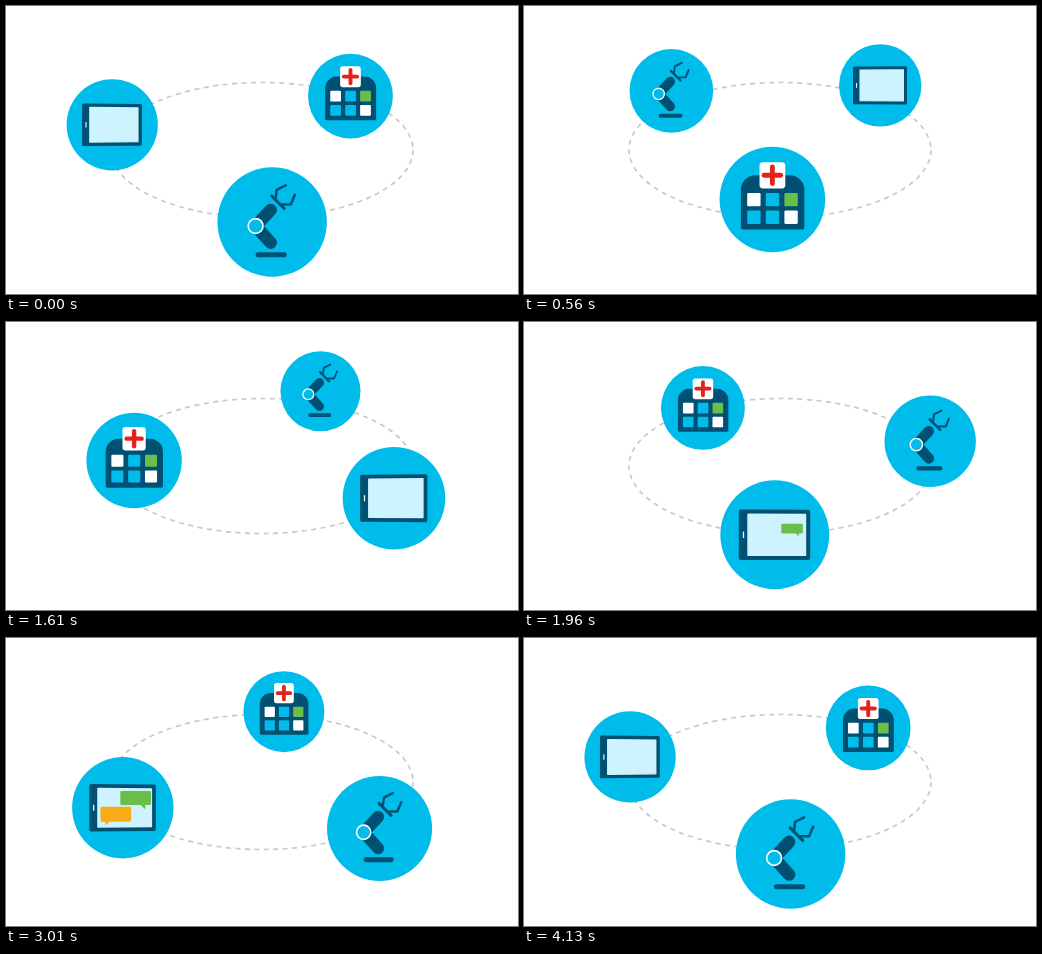
Animation, 512 px wide and 288 px high, one loop 4200 ms. Source, as an HTML page with a canvas:

```html
<!DOCTYPE html>
<html lang="en">
<head>
<meta charset="utf-8">
<title>Connected care</title>
<style>
html, body { margin: 0; width: 100%; height: 100%; overflow: hidden; background: #fff; }
canvas { display: block; width: 512px; height: 288px; }
</style>
</head>
<body>
<canvas id="stage"></canvas>
<script>
const LOOP = 4200, STEP = 1400;
const CYAN = '#00bceb', NAVY = '#005073', GREEN = '#6abf4b', ORANGE = '#fbab18',
      RED = '#e2231a', SCREEN = '#cdf3ff', WHITE = '#fff', GREY = '#c9c9cb';

const canvas = document.getElementById('stage');
const ctx = canvas.getContext('2d');
const dpr = window.devicePixelRatio || 1;
canvas.width = 512 * dpr;
canvas.height = 288 * dpr;

const rad = deg => deg * Math.PI / 180;
const mix = (a, b, k) => a + (b - a) * k;
const clamp = v => Math.min(1, Math.max(0, v));
const ramp = (t, from, to) => clamp((t - from) / (to - from));
const smooth = k => k * k * (3 - 2 * k);

// keys: orbit angle and offset at each stop; bulge: bend of the path on the way to the next one
const items = [
  { draw: tablet,
    keys: [[200, -8, -2], [308, 2, -13], [448, -2, 1]],
    bulge: [[0, -6], [6, 0], [4.6, -1]] },
  { draw: hospital,
    keys: [[306, -0.5, 0.6], [450, 1, -17.5], [596, 0, -0.4]],
    bulge: [[-24, 0], [24, 0], [0, -4]] },
  { draw: robot,
    keys: [[86, 0, 4.7], [222, -2, -11], [335, 10.3, 0.7]],
    bulge: [[-5, 0], [0, -8], [2, -2.3]] }
];

// quick travel, then a damped swing around the stop
function travel(ms) {
  const arrive = 320;
  if (ms < arrive) return Math.pow(ms / arrive, 1.2);
  const s = ms - arrive;
  return 1 + 0.24 * Math.exp(-0.0066 * s) * Math.sin(Math.PI * s / 285);
}

function place(item, t) {
  const i = Math.floor(t / STEP) % 3;
  const k = travel(t % STEP);
  const a = item.keys[i], b = item.keys[(i + 1) % 3];
  const turn = (b[0] - a[0] + 720) % 360;
  const angle = rad(a[0] + turn * k);
  const bend = Math.sin(Math.PI * clamp(k));
  const x = 256 + 151 * Math.cos(angle) + mix(a[1], b[1], k) + item.bulge[i][0] * bend;
  const y = 144 + 67.5 * Math.sin(angle) + mix(a[2], b[2], k) + item.bulge[i][1] * bend;
  const d = y - 73.5;
  return { x, y, r: 40.5 + 0.1 * d + 0.7 * Math.sin(Math.PI * d / 140) };
}

function box(x, y, w, h, r, color) {
  ctx.fillStyle = color;
  ctx.beginPath();
  ctx.roundRect(x, y, w, h, r);
  ctx.fill();
}

function line(points, width, color, cap = 'round') {
  ctx.strokeStyle = color;
  ctx.lineWidth = width;
  ctx.lineCap = cap;
  ctx.lineJoin = 'round';
  ctx.beginPath();
  points.forEach(p => ctx.lineTo(p[0], p[1]));
  ctx.stroke();
}

function disc(x, y, r, color) {
  ctx.fillStyle = color;
  ctx.beginPath();
  ctx.arc(x, y, r, 0, Math.PI * 2);
  ctx.fill();
}

// panel whose two sides differ a little in height
function panel(x0, x1, h, tilt, round, color) {
  const l = h * (1 + tilt) - round, r = h * (1 - tilt) - round;
  ctx.fillStyle = ctx.strokeStyle = color;
  ctx.lineWidth = round * 2;
  ctx.lineJoin = 'round';
  ctx.beginPath();
  ctx.moveTo(x0 + round, -l);
  ctx.lineTo(x1 - round, -r);
  ctx.lineTo(x1 - round, r);
  ctx.lineTo(x0 + round, l);
  ctx.closePath();
  ctx.fill();
  ctx.stroke();
}

// speech bubble that scales from the tip of its tail
function bubble(tipX, tipY, left, top, h, lean, size, color) {
  if (size <= 0) return;
  ctx.save();
  ctx.translate(tipX, tipY);
  ctx.scale(size, size);
  box(left, top, 33, h, 1.5, color);
  ctx.beginPath();
  ctx.moveTo(0, 0);
  ctx.lineTo(0, top + h - 1);
  ctx.lineTo(lean, top + h - 1);
  ctx.fill();
  ctx.restore();
}

function tablet(t, x) {
  const tilt = (256 - x) / 150 * 0.011;
  panel(-36, 35.5, 25.2, tilt, 2, NAVY);
  panel(-27.5, 31.5, 21.2, tilt, 0.8, SCREEN);
  line([[-31.3, -3.2], [-31.3, 3.2]], 1.3, WHITE, 'butt');
  const green = smooth(ramp(t, 1840, 2040)) * (1 - smooth(ramp(t, 3290, 3470)));
  const orange = smooth(ramp(t, 2300, 2500)) * (1 - smooth(ramp(t, 3490, 3680)));
  bubble(24, 1.8, -26.7, -19.8, 15, -5.5, green, GREEN);
  bubble(-18.7, 19, -5.3, -20, 16, 5.5, orange, ORANGE);
}

function hospital(t) {
  box(-32.5, -25, 65.5, 56, [15, 15, 2, 2], NAVY);
  box(-13.3, -38.4, 26.6, 27, 3.5, WHITE);
  line([[-8.6, -25], [8.6, -25]], 5, RED);
  line([[0, -33.6], [0, -16.4]], 5, RED);
  const swap = t > 840 && t < 1540;
  const rows = [[WHITE, CYAN, GREEN], swap ? [CYAN, WHITE, CYAN] : [CYAN, CYAN, WHITE]];
  rows.forEach((row, j) => row.forEach((color, i) =>
    box(-26 + 19.2 * i, -6.7 + 18.1 * j, 13.8, 13.8, 1.2, color)));
}

function robot(t) {
  const p = smooth(ramp(t, 3300, 3560)) * (1 - smooth(ramp(t, 3760, 4160)));
  const at = (x0, y0, x1, y1) => [mix(x0, x1, p), mix(y0, y1, p)];
  const joint = at(-16.5, 4, -13, 1);
  const foot = at(-1.5, 20.5, -1.5, 19);
  const hand = at(-1.5, -12, -2.5, -18);
  line([[-14, 32.5], [12, 32.5]], 5, NAVY);
  line([foot, joint, hand], 12.5, NAVY);
  line([at(-0.5, -26, -4.5, -32), at(12, -13.5, 11.5, -22)], 3, NAVY);
  line([at(3.5, -23.5, 0.5, -30), at(4.5, -32, 1, -38), at(13.5, -36.5, 10.5, -42)], 2.5, NAVY);
  line([at(10, -17.5, 9, -26), at(18.5, -17.5, 15, -29.5), at(22.5, -27, 14.5, -39)], 2.5, NAVY);
  disc(joint[0], joint[1], 8.2, WHITE);
  disc(joint[0], joint[1], 6.5, CYAN);
}

function orbit() {
  ctx.strokeStyle = GREY;
  ctx.lineWidth = 1.7;
  ctx.lineCap = 'butt';
  ctx.setLineDash([5, 4.5]);
  ctx.beginPath();
  ctx.ellipse(256, 144, 151, 67.5, 0, 0, Math.PI * 2);
  ctx.stroke();
  ctx.setLineDash([]);
}

function render(t) {
  ctx.setTransform(dpr, 0, 0, dpr, 0, 0);
  ctx.fillStyle = WHITE;
  ctx.fillRect(0, 0, 512, 288);
  orbit();
  items.map(item => ({ draw: item.draw, ...place(item, t) }))
    .sort((a, b) => a.y - b.y)
    .forEach(({ draw, x, y, r }) => {
      disc(x, y, r, CYAN);
      ctx.save();
      ctx.translate(x, y);
      ctx.scale(r / 54.5, r / 54.5);
      draw(t, x);
      ctx.restore();
    });
}

const start = performance.now();
function tick() {
  render((performance.now() - start) % LOOP);
  requestAnimationFrame(tick);
}
tick();
</script>
</body>
</html>
```
